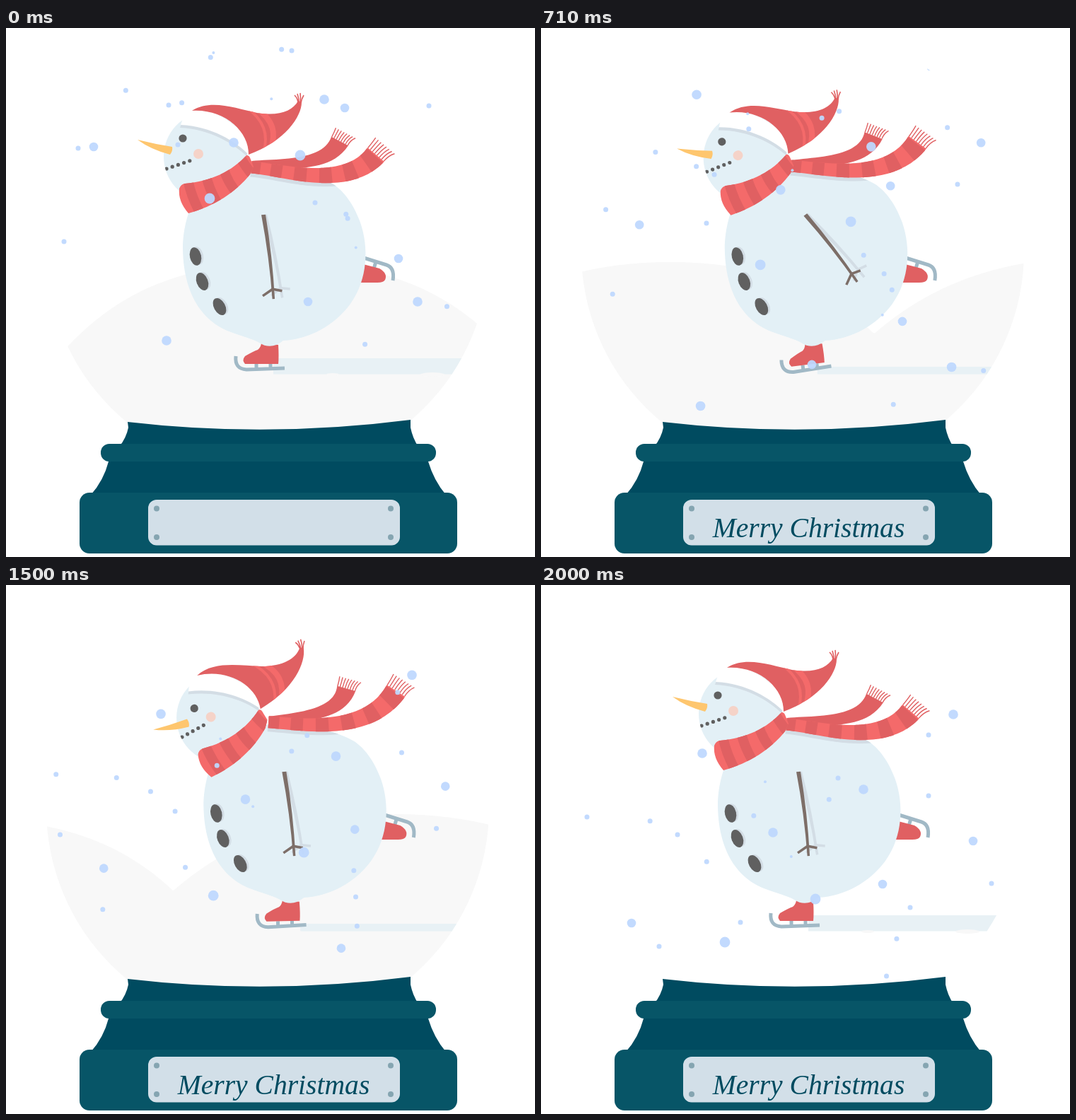
These frames come from a looping animation (748x748 px, 2040 ms). An HTML page with a canvas:

```html
<!DOCTYPE html>
<html lang="en">
<head>
<meta charset="utf-8">
<title>Skating snowman globe</title>
<style>
html, body { margin: 0; width: 100%; height: 100%; overflow: hidden; background: #fff; }
canvas { display: block; width: 100vw; height: 100vh; }
</style>
</head>
<body>
<canvas id="stage" width="748" height="748"></canvas>
<script>
const c = document.getElementById('stage').getContext('2d');
const LOOP = 2040, RED = '#e06062', LIGHT = '#f46a6a', SHADE = '#d3dde5',
  ICE = '#e3f0f6', COAL = '#606060', BARK = '#7d6e68', STEEL = '#a1b9c6',
  GROUND = '#f8f8f8', DEEP = '#004b60', TEAL = '#075567';

const shape = d => new Path2D(d);
const body = shape('M275 230C258 250 250 285 250 312C251 385 285 418 318 430C340 438 350 440 358 445Q375 456 392 442C430 440 465 420 487 390C512 355 513 310 501 275C490 245 475 229 463 221C440 207 400 198 345 195Z');
const head = shape('M223 182a59 62 0 1 1 118 0a59 62 0 1 1 -118 0');
const hat = shape('M263 117C290 100 325 114 355 120C385 125 405 118 413 103L418 105C418 125 395 160 343 179C344 146 308 114 263 117Z');
const trim = shape('M263 116C305 114 346 148 344 180C325 160 290 139 247 137Q250 123 263 116Z');
const collar = shape('M253 220C290 217 320 202 340 180Q344 179 346 186L350 196L345 207C325 232 295 252 258 262Q243 245 245 227Q247 221 253 220Z');
const bands = shape('M257 214Q262 240 277 266M283 208Q287 230 305 258M307 196Q312 218 332 240M330 180Q338 196 352 212');
const nose = shape('M186 158Q210 164 235 168Q236 174 232 179Q205 172 186 158Z');
const tassel = shape('M413 105Q412 99 408 95M414 105Q414 99 412 93M416 105Q417 98 416 92M417 106Q418 100 421 95');
const boot = shape('M361 446L385 448Q386 465 385 475L338 475Q333 470 338 464Q350 457 356 455Q360 452 361 446Z');
const blade = shape('M325 464Q323 482 340 483L394 481M354 475V483M374 475V482');
const rearBoot = shape('M505 334L528 340Q540 347 536 356Q534 360 525 360H498Z');
const rearBlade = shape('M506 325L538 335Q550 339 547 357M523 330L520 341');
const arm = shape('M361 264H367Q370 325 366.5 384H363Q365.5 325 361 264Z');
const twigs = shape('M350 378L365 370L378 374');
const stand = shape('M172 557Q370 580 572 554V565Q575 580 583 592H597V613Q605 640 622 660H120Q138 640 145 613V592H160Q170 580 173 565Z');

function fill(path, color) { c.fillStyle = color; c.fill(path); }
function stroke(path, color, width) { c.strokeStyle = color; c.lineWidth = width; c.stroke(path); }
function dot(x, y, rx, color, ry = rx, turn = 0) {
  c.beginPath();
  c.ellipse(x, y, rx, ry, turn, 0, 7);
  c.fillStyle = color;
  c.fill();
}
function box(x, y, w, h, r, color) {
  c.beginPath();
  c.roundRect(x, y, w, h, r);
  c.fillStyle = color;
  c.fill();
}
function group(draw) { c.save(); draw(); c.restore(); }
function turn(x, y, degrees) {
  c.translate(x, y);
  c.rotate(degrees * Math.PI / 180);
  c.translate(-x, -y);
}
function clipGlobe() {
  c.beginPath();
  c.arc(370, 316, 313, 0, 7);
  c.clip();
}
const mix = (a, b, k) => a + (b - a) * k;

// Eased value through time, value pairs
function keys(t, ...k) {
  if (t <= k[0]) return k[1];
  for (let i = 2; i < k.length; i += 2) {
    if (t < k[i]) {
      const u = (t - k[i - 2]) / (k[i] - k[i - 2]);
      return mix(k[i - 1], k[i + 1], u * u * (3 - 2 * u));
    }
  }
  return k[k.length - 1];
}

let seed = 7;
function random(a, b) {
  seed = seed * 16807 % 2147483647;
  return mix(a, b, seed / 2147483647);
}

// A falling flake: start, sideways drift, fall over the loop and bend of its path
const flake = (r, x, y, drift, fall, bend) => ({ r, x, y, drift, fall, bend });
const CLUSTER = [[-355, 55], [0, 0], [128, -61], [483, -116]];
const clusters = [
  flake(6.3, 479, 113, 4, 310, 15),
  flake(6.8, 322, 162, 6, 188, 16),
  flake(7.4, 288, 241, -28, 264, 35),
  flake(6.3, 427, 387, -98, 250, -10),
  flake(6.8, 582, 387, -4, 260, 0),
  flake(6.8, 592, -40, -9, 223, -15),
  flake(3.5, 404, 32, 16, 241, 13),
  flake(3.5, 102, 170, -37, 244, 3),
  flake(3.5, 598, 110, 39, 312, -25),
  flake(3.5, -46, 363, 85, 209, -12)
];
const snow = clusters.flatMap(f => CLUSTER.map(([dx, dy]) => ({ ...f, x: f.x + dx, y: f.y + dy })));
for (let i = 0; i < 12; i++) {
  snow.push(flake(i % 3 ? 3.5 : 2, random(70, 670), random(-220, 540),
    random(-35, 35), random(220, 290), random(-15, 15)));
}

function drawSnow(t) {
  const u = t / 2000;
  c.globalAlpha = .94;
  for (const f of snow) {
    dot(f.x + f.drift * u + f.bend * 4 * u * (1 - u), f.y + f.fall * u, f.r, '#bfd8fe');
  }
}

function drawHills(t) {
  const valley = 545 - .297 * (t - 460);
  const dome = (top, d, k) => top + .0008 * d * d + k * d ** 4;
  c.beginPath();
  c.moveTo(50, 640);
  for (let x = 50; x <= 690; x += 2) {
    c.lineTo(x, Math.min(dome(331, x - valley + 288, 5e-9), dome(324, x - valley - 315, 3e-9)));
  }
  c.lineTo(690, 640);
  c.fillStyle = GROUND;
  c.fill();
}

// The icy track is wide for a moment once a second
function drawTrack(t, shift) {
  const wide = t % 1000 < 80;
  box(378 + 1.3 * shift, wide ? 467 : 479, 300, wide ? 22.5 : 10.5, 0, '#e8f1f5');
  if (wide) {
    dot(462, 490, 9, GROUND, 2);
    dot(603, 490, 17, GROUND, 3);
  }
}

// A ribbon along a cubic curve given by its four points
function ribbon([x0, y0, x1, y1, x2, y2, x3, y3], w0, w1) {
  const pos = (a, b, d, e, u) => mix(mix(mix(a, b, u), mix(b, d, u), u), mix(mix(b, d, u), mix(d, e, u), u), u);
  const vel = (a, b, d, e, u) => mix(mix(b - a, d - b, u), mix(d - b, e - d, u), u);
  const side = (u, s) => {
    const dx = vel(x0, x1, x2, x3, u), dy = vel(y0, y1, y2, y3, u);
    const k = s * mix(w0, w1, u * u) / 2 / Math.hypot(dx, dy);
    return [pos(x0, x1, x2, x3, u) - dy * k, pos(y0, y1, y2, y3, u) + dx * k];
  };
  const part = (a, b) => {
    const path = new Path2D(), n = 24;
    for (let i = 0; i <= n; i++) path.lineTo(...side(mix(a, b, i / n), -1));
    for (let i = n; i >= 0; i--) path.lineTo(...side(mix(a, b, i / n), 1));
    return path;
  };
  const fringe = len => {
    const path = new Path2D(), size = Math.hypot(x3 - x2, y3 - y2);
    const dx = (x3 - x2) / size, dy = (y3 - y2) / size;
    for (let s = -.95; s < 1; s += .27) {
      const [x, y] = side(1, s), spread = s * 3 + 2;
      path.moveTo(x, y);
      path.quadraticCurveTo(x + dx * len * .6, y + dy * len * .6,
        x + dx * len - dy * spread, y + dy * len + dx * spread);
    }
    return path;
  };
  return { part, fringe };
}

function drawArm(angle, color) {
  group(() => {
    turn(364, 264, -angle);
    fill(arm, color);
    stroke(twigs, color, 3.5);
  });
}

function drawHead(h) {
  fill(head, ICE);
  group(() => {
    c.clip(head);
    for (let i = 0; i < 5; i++) dot(227 + 8.2 * i, 199 - 2.8 * i, 2.6, COAL);
    c.translate(-1, 4);
    fill(trim, SHADE);
  });
  dot(250 + h, 156 + 6 * h, 5.6, COAL);
  dot(272, 178, 7, '#f5d3c8');
  group(() => {
    c.translate(5 * h, 7 * h);
    turn(234, 173, -19 * h);
    fill(nose, '#fec66e');
  });
  fill(trim, '#fff');
  fill(hat, RED);
  group(() => {
    c.clip(hat);
    stroke(shape('M340 112C364 130 372 150 364 176'), LIGHT, 4);
    stroke(shape('M353 112C380 132 382 150 374 172'), LIGHT, 8);
  });
  stroke(tassel, RED, 1.6);
  fill(collar, LIGHT);
  group(() => {
    c.clip(collar);
    stroke(bands, RED, 14);
  });
}

function drawSnowman(t, shift) {
  const h = keys(t, 560, 0, 1000, 1, 1570, 1, 1960, 0);
  const wave = keys(t, 560, 0, 1000, 1, 1960, 0);
  const tilt = keys(t, 520, 0, 720, 7, 1050, 7, 1670, 0);
  const swing = keys(t, 80, 6.5, 420, -24, 820, 51, 980, 51, 1440, 6.5);
  const pose = (a, b) => a.map((v, i) => mix(v, b[i], wave));
  const lower = ribbon(pose([347, 197, 390, 200, 480, 230, 523, 179], [336, 190, 400, 195, 485, 190, 521, 116]), 17, 31);
  const upper = ribbon(pose([348, 194, 390, 190, 452, 198, 472, 160], [337, 190, 380, 180, 428, 172, 429, 131]), 12, 27);
  const tipHead = () => turn(315, 249, -10 * h);

  c.translate(shift, 0);
  stroke(rearBlade, STEEL, 5);
  fill(rearBoot, RED);
  group(() => {
    turn(372, 425, -tilt);
    stroke(blade, STEEL, 5);
    fill(boot, RED);
  });
  fill(body, ICE);
  for (let i = 0; i < 3; i++) {
    const x = 268 + 2 * i + 7.5 * i * i, y = 323 + 35.5 * i, lean = -.22 - .14 * i;
    dot(x + 3, y - 1, 8, SHADE, 13, lean);
    dot(x, y, 8, COAL, 13, lean);
  }
  group(() => {
    c.clip(body);
    c.translate(-1, 5);
    fill(lower.part(0, 1), SHADE);
  });
  group(() => {
    c.translate(2, 0);
    drawArm(swing + 5, SHADE);
  });
  drawArm(swing, BARK);

  fill(upper.part(0, 1), RED);
  stroke(upper.fringe(14), RED, 1.4);
  fill(lower.part(0, 1), LIGHT);
  for (let i = 0; i < 6; i++) fill(lower.part(.18 * i, .18 * i + .09), RED);
  stroke(lower.fringe(18), RED, 1.4);
  group(() => {
    tipHead();
    drawHead(h);
  });
}

function drawStand(t) {
  fill(stand, DEEP);
  box(134, 588, 474, 25, 12, TEAL);
  box(104, 657, 534, 86, 14, TEAL);
  box(201, 667, 356, 64.5, 12, '#d2dfe8');
  for (const x of [213, 544]) for (const y of [679.5, 720]) dot(x, y, 4, '#85a5b1');
  c.globalAlpha = keys(t, 200, 0, 680, 1);
  c.fillStyle = DEEP;
  c.font = 'italic 39.6px "Liberation Serif", serif';
  c.textAlign = 'center';
  c.fillText('Merry Christmas', 378.5, 720);
}

function frame(now) {
  let t = now % LOOP;
  if (t % 1000 < 80) t -= t % 1000; // short rest on each second
  const shift = keys(t, 560, 0, 1000, 36, 1380, 36, 1820, 0);
  c.fillStyle = '#fff';
  c.fillRect(0, 0, 748, 748);
  group(() => {
    clipGlobe();
    if (t < 2000) drawHills(t);
    drawTrack(t, shift);
  });
  group(() => drawSnowman(t, shift));
  group(() => {
    clipGlobe();
    drawSnow(t);
  });
  group(() => drawStand(t));
}

const begin = performance.now();
function tick() {
  frame(performance.now() - begin);
  requestAnimationFrame(tick);
}
tick();
</script>
</body>
</html>
```
